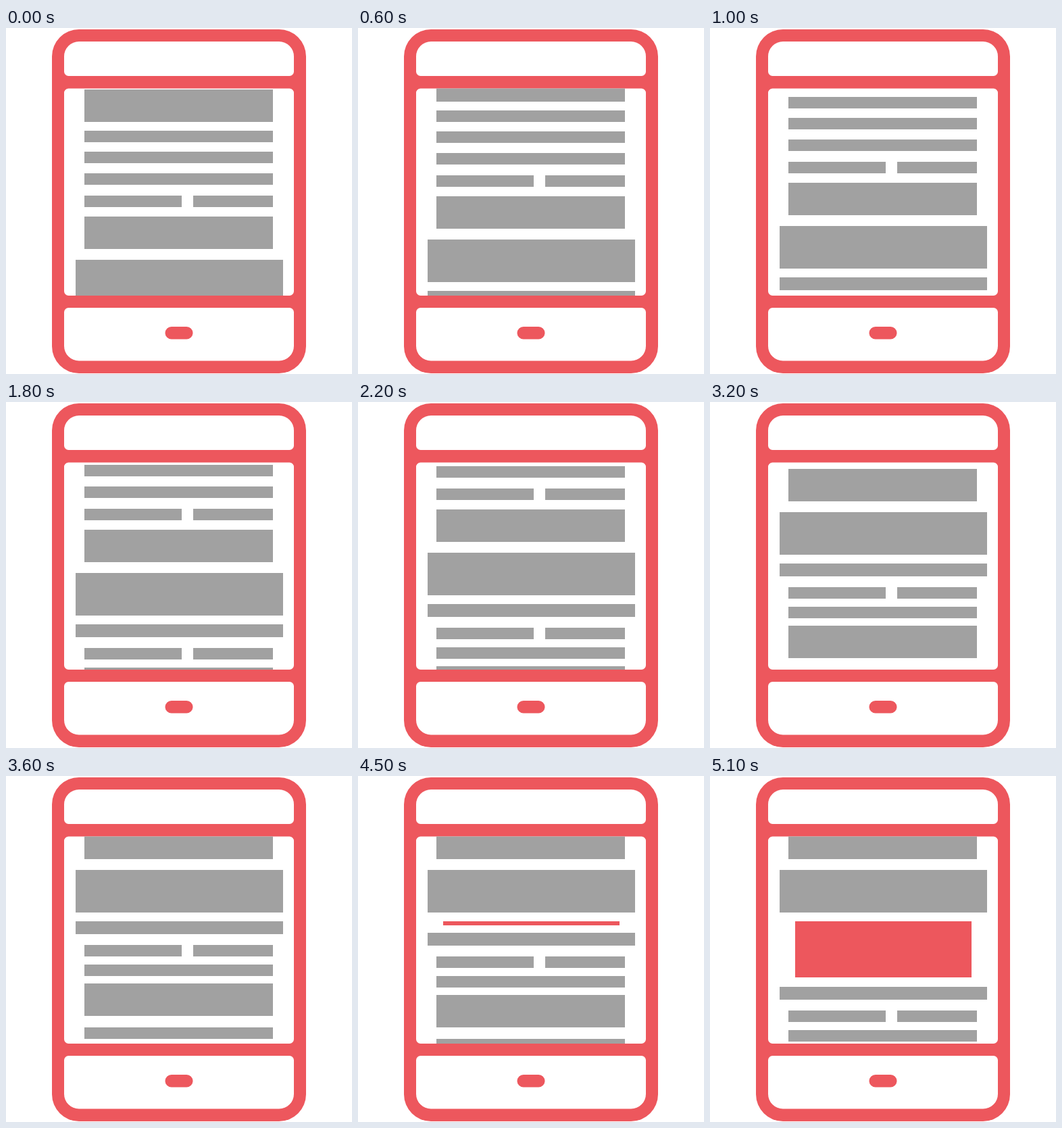
An HTML page that plays this animation: 512 by 512 pixels, repeating every 5.6 s.

```html
<!DOCTYPE html>
<html lang="en">
<head>
<meta charset="utf-8">
<title>Scrolling tablet</title>
<style>
  html, body { margin: 0; width: 100%; height: 100%; overflow: hidden; background: #fff; }
  svg { display: block; width: 100vw; height: 100vh; }
  .red { fill: #ed575d; }
  .gray { fill: #a1a1a1; }
  .bar { shape-rendering: crispEdges; }
</style>
</head>
<body>
<svg viewBox="0 0 512 512">
  <defs>
    <clipPath id="screen"><rect x="86" y="89.5" width="340" height="306.5" rx="6.5"/></clipPath>
  </defs>
  <path class="red" fill-rule="evenodd" d="
    M108 2H404A40 40 0 0 1 444 42V471A40 40 0 0 1 404 511H108A40 40 0 0 1 68 471V42A40 40 0 0 1 108 2Z
    M108 20A22 22 0 0 0 86 42V64.5A6.5 6.5 0 0 0 92.5 71H419.5A6.5 6.5 0 0 0 426 64.5V42A22 22 0 0 0 404 20Z
    M92.5 89.5A6.5 6.5 0 0 0 86 96V389.5A6.5 6.5 0 0 0 92.5 396H419.5A6.5 6.5 0 0 0 426 389.5V96A6.5 6.5 0 0 0 419.5 89.5Z
    M92.5 414A6.5 6.5 0 0 0 86 420.5V470.5A22 22 0 0 0 108 492.5H404A22 22 0 0 0 426 470.5V420.5A6.5 6.5 0 0 0 419.5 414Z"/>
  <rect class="red" x="235.5" y="442" width="41" height="18.5" rx="9.25"/>
  <g clip-path="url(#screen)">
    <g id="page">
      <g id="above" class="gray"></g>
      <rect id="banner" class="red bar" x="126" y="419" width="261" height="0"/>
      <g id="below" class="gray"></g>
    </g>
  </g>
</svg>
<script>
const LOOP = 5600, STEP = 200, OPEN = 4500, OPEN_STEP = 100;
const scroll = [0, 10, 20, 30, 40, 50, 60, 70, 80, 90, 110, 120, 130, 140, 160, 170, 180, 190, 204];

const $ = id => document.getElementById(id);
const page = $('page'), above = $('above'), below = $('below'), banner = $('banner');

function bar(group, y, height, x = 116, width = 279) {
  const r = document.createElementNS('http://www.w3.org/2000/svg', 'rect');
  r.setAttribute('class', 'bar');
  Object.entries({ x, y, width, height }).forEach(([k, v]) => r.setAttribute(k, v));
  group.append(r);
}
const wide = (group, y, height) => bar(group, y, height, 103, 307);
const split = (group, y) => {
  bar(group, y, 17, 116, 144);
  bar(group, y, 17, 277, 118);
};

bar(above, 91, 48);
[152, 183, 215].forEach(y => bar(above, y, 17));
split(above, 248);
bar(above, 279, 48);
wide(above, 343, 63);

wide(below, 419, 19);
split(below, 454);
bar(below, 483, 17);
bar(below, 511, 48);
bar(below, 576, 17);

function draw(t) {
  const i = Math.min(Math.floor(t / STEP), scroll.length - 1);
  page.setAttribute('transform', `translate(0 ${-scroll[i]})`);

  // The banner opens in seven steps and pushes the rest down.
  const k = Math.min(Math.floor((t - OPEN) / OPEN_STEP), 6);
  const open = k >= 0;
  banner.setAttribute('height', open ? Math.round(6 + 77 * k / 6) : 0);
  below.setAttribute('transform', `translate(0 ${open ? Math.round(17 + 80 * k / 6) : 0})`);
}

const start = performance.now();
function tick() {
  draw((performance.now() - start) % LOOP);
  requestAnimationFrame(tick);
}
tick();
</script>
</body>
</html>
```
